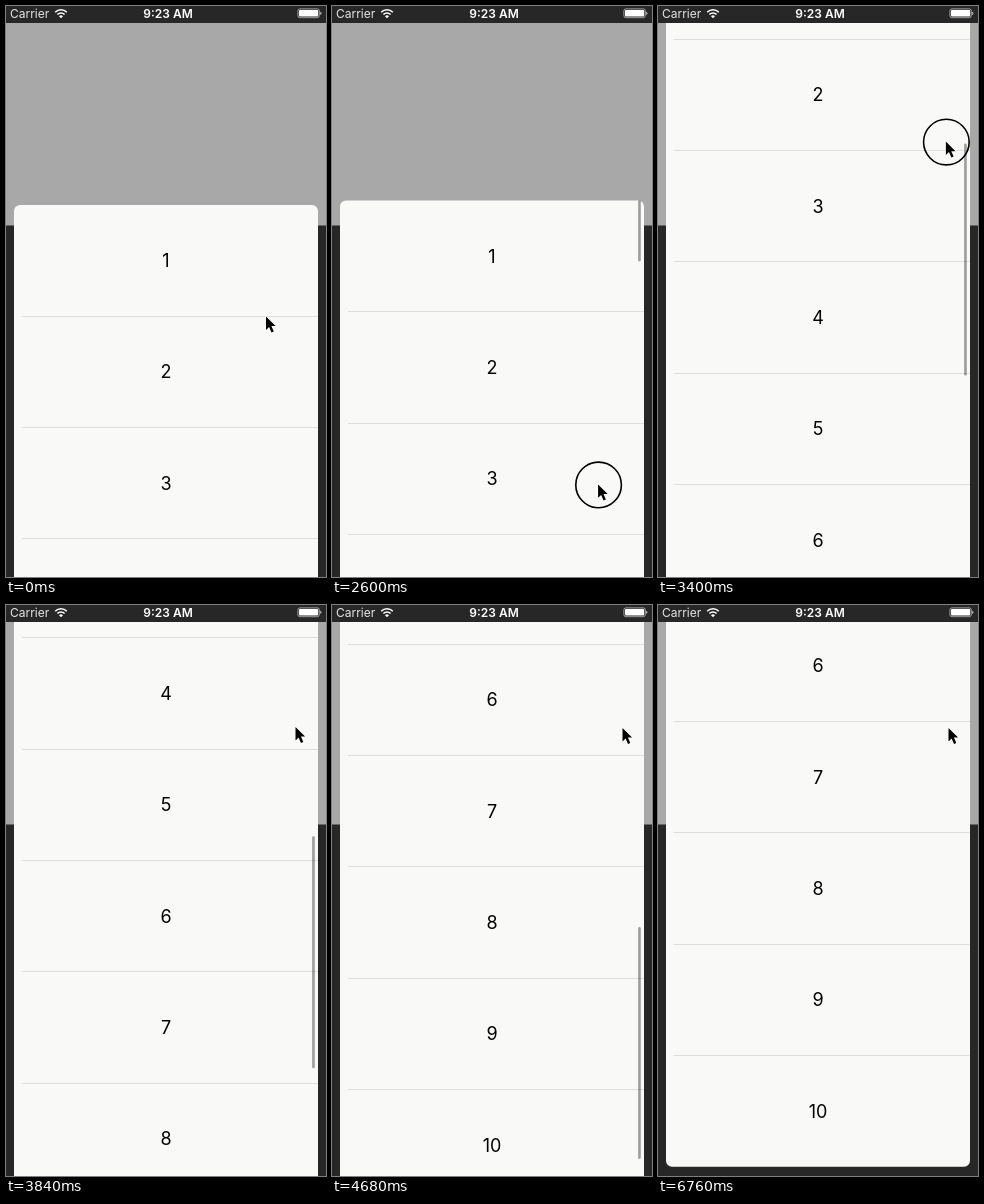
Write an HTML page that moves like this. It is 320 px wide and 571 px high and loops after 8000 ms.

```html
<!DOCTYPE html>
<html lang="en">
<head>
<meta charset="utf-8">
<title>Scrolling sheet</title>
<style>
  html, body { margin: 0; width: 100%; height: 100%; overflow: hidden; background: #282727; }
  svg { display: block; width: 100%; height: 100%; }
  text { font-family: Inter, Roboto, "Liberation Sans", sans-serif; }
</style>
</head>
<body>
<svg viewBox="0 0 320 571">
  <rect width="320" height="571" fill="#282727"/>
  <rect y="17" width="320" height="202.5" fill="#a8a8a8"/>

  <g id="sheet"></g>
  <rect id="bar" x="306.1" width="2.7" rx="1.3" fill="#000" fill-opacity=".36"/>

  <rect width="320" height="17" fill="#282727"/>
  <g fill="#fff" font-size="12">
    <text x="4" y="12" fill="#e6e6e6">Carrier</text>
    <text x="162" y="12" text-anchor="middle" font-weight="600">9:23 AM</text>
  </g>
  <g fill="none" stroke="#fff" stroke-width="1.6">
    <path d="M49.2 6.2a8.2 8.2 0 0 1 11.6 0M51.4 8.5a5.1 5.1 0 0 1 7.2 0"/>
    <path d="M55 12.2L53 10.2a2.9 2.9 0 0 1 4 0Z" fill="#fff" stroke="none"/>
  </g>
  <rect x="291.9" y="2.9" width="21.4" height="8.8" rx="2" fill="none" stroke="#fff" stroke-width=".8" stroke-opacity=".7"/>
  <rect x="293" y="4" width="19.2" height="6.6" rx="1" fill="#fff"/>
  <path d="M314.4 5.7q2 1.6 0 3.2z" fill="#fff"/>

  <circle id="ring" r="22.8" fill="none" stroke="#000" stroke-width="1.6"/>
  <path id="cursor" d="M0 0V13.4L3.1 10.5L5.5 16L7.8 15L5.4 9.6H9.6Z"
        stroke="#fff" stroke-width="1.4" paint-order="stroke" stroke-linejoin="round"/>
</svg>
<script>
const LOOP = 8000, ROWS = 10, ROW_H = 111.33, TOP = 199, MAX_SCROLL = 750.5;
const SHEET_H = ROWS * ROW_H;

const scrollKeys = [
  [2520, 0], [2800, 38], [3040, 111.2], [3240, 195], [3480, 318], [3840, 499.5], [4240, 630],
  [4680, 716.2], [5000, 751], [5200, 762], [5520, 755.8], [5880, 751.7], [6120, 751], [6640, 750.5]
];
const cursorX = [[880, 260], [1440, 263], [1680, 263], [2160, 266], [2520, 266], [3040, 269], [3480, 289.5], [3840, 289.5], [4200, 290.5]];
const cursorY = [[880, 310.5], [1440, 405], [1680, 447], [2160, 484.5], [2520, 484.5], [3040, 331.5], [3480, 122], [3840, 122], [4200, 123]];

const $ = id => document.getElementById(id);

function add(parent, tag, attrs, text) {
  const node = document.createElementNS("http://www.w3.org/2000/svg", tag);
  set(node, attrs);
  if (text) node.textContent = text;
  parent.append(node);
  return node;
}

function set(node, attrs) {
  for (const key in attrs) node.setAttribute(key, attrs[key]);
}

// Smooth curve through keys that never overshoots them.
function curve(keys, t) {
  const last = keys.length - 1;
  if (t <= keys[0][0]) return keys[0][1];
  if (t >= keys[last][0]) return keys[last][1];
  const slope = i => i < 0 || i >= last ? 0 : (keys[i + 1][1] - keys[i][1]) / (keys[i + 1][0] - keys[i][0]);
  const tangent = i => {
    const a = slope(i - 1), b = slope(i);
    return a * b > 0 ? 2 * a * b / (a + b) : 0;
  };
  const i = keys.findIndex(k => k[0] > t) - 1;
  const [t0, v0] = keys[i], [t1, v1] = keys[i + 1];
  const d = t1 - t0, u = (t - t0) / d, w = 1 - u;
  return v0 * w * w * (1 + 2 * u) + v1 * u * u * (3 - 2 * u)
    + d * u * w * (tangent(i) * w - tangent(i + 1) * u);
}

const sheet = $("sheet");
add(sheet, "rect", { x: 8, width: 304, height: SHEET_H, rx: 6, fill: "#f9f9f8" });
const lines = [];
for (let i = 0; i < ROWS; i++) {
  add(sheet, "text", { x: 160, y: (i + 0.5) * ROW_H + 6.5, "font-size": 18, "text-anchor": "middle" }, i + 1);
  if (i) lines.push(add(sheet, "rect", { x: 16, width: 296, height: 1, fill: "#dededd" }));
}

function drawBar(t, scroll, top) {
  const over = Math.max(0, scroll - MAX_SCROLL);
  const start = 21.5 + 0.4195 * (scroll - over) + over;
  const end = start + 232 - over;
  const y0 = Math.max(start, top), y1 = Math.min(end, top + SHEET_H);
  const fade = Math.min(1, Math.max(0, (6760 - t) / 320));
  set($("bar"), { y: y0, height: y1 - y0, opacity: t < 2560 ? 0 : fade });
}

function render(t) {
  const scroll = curve(scrollKeys, t);
  const top = Math.round((TOP - scroll) * 2) / 2;
  set(sheet, { transform: `translate(0 ${top})` });
  lines.forEach((line, i) => set(line, { y: Math.floor(top + (i + 1) * ROW_H) - top }));
  drawBar(t, scroll, top);

  const x = curve(cursorX, t), y = curve(cursorY, t);
  set($("cursor"), { transform: `translate(${x} ${y})` });
  set($("ring"), { cx: x + 0.5, cy: y + 0.5, opacity: t >= 2520 && t < 3480 ? 1 : 0 });
}

const began = performance.now();
function tick() {
  render((performance.now() - began) % LOOP);
  requestAnimationFrame(tick);
}
tick();
</script>
</body>
</html>
```
